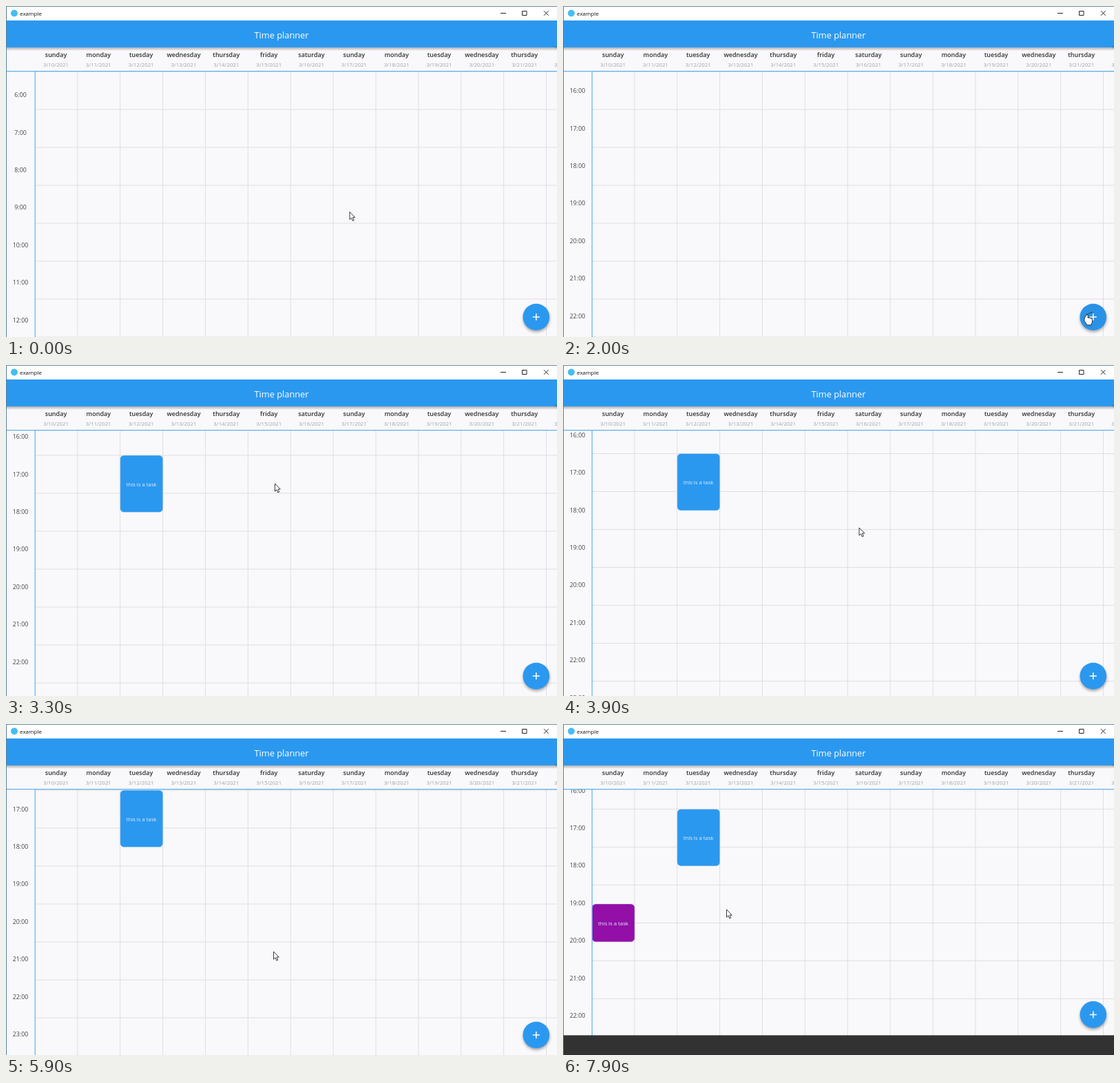
An HTML page that plays this animation: 800 px wide and 480 px high, repeating every 8 s.

```html
<!DOCTYPE html>
<html lang="en">
<head>
<meta charset="utf-8">
<title>Time planner</title>
<style>
html, body { margin: 0; width: 100%; height: 100%; overflow: hidden; background: #f9f8fb; }
svg { display: block; }
text { font-family: "Open Sans", "Noto Sans", sans-serif; text-anchor: middle; }
.day { font-size: 9px; font-weight: 600; fill: #303030; }
.date { font-size: 7.8px; fill: #a0a0a2; }
.hour { font-size: 8.8px; fill: #444; }
.task text { font-size: 7.75px; fill: #e4effa; }
.task rect { stroke: #d9e2ea; stroke-width: .5; }
.grid { stroke: #dfdee1; stroke-width: 1; }
.rule { stroke: #62b1e8; stroke-width: 1.2; }
</style>
</head>
<body>
<svg width="800" height="480" viewBox="0 0 800 480">
  <defs>
    <clipPath id="body"><rect y="95" width="800" height="385"/></clipPath>
    <clipPath id="app"><rect y="21" width="800" height="459"/></clipPath>
    <linearGradient id="shade" x2="0" y2="1">
      <stop offset="0" stop-opacity=".3"/><stop offset="1" stop-opacity="0"/>
    </linearGradient>
    <filter id="soft" x="-30%" y="-30%" width="160%" height="160%"><feGaussianBlur stdDeviation="2"/></filter>
  </defs>
  <rect width="800" height="480" fill="#f9f8fb"/>

  <g clip-path="url(#body)">
    <g id="columns" class="grid"></g>
    <g id="scroller">
      <g id="rows" class="grid"></g>
      <g id="tasks"></g>
    </g>
    <g id="hours"></g>
  </g>
  <path class="rule" d="M0 94.6H800M42.2 95V480"/>
  <g id="days"></g>

  <rect y="60" width="800" height="5" fill="url(#shade)"/>
  <rect y="21" width="800" height="39" fill="#2b98ef"/>
  <text x="400" y="46.6" font-size="12.8" font-weight="500" fill="#fff">Time planner</text>
  <g clip-path="url(#app)" transform="translate(784 37.5)">
    <g transform="rotate(45)">
      <rect x="-40" y="-4.2" width="80" height="8.4" filter="url(#soft)" opacity=".35"/>
      <rect x="-40" y="-4.2" width="80" height="8.4" fill="#7d2343"/>
      <text y="2.6" font-size="7.1" font-weight="800" fill="#fff">DEBUG</text>
    </g>
  </g>

  <rect width="800" height="21" fill="#fff"/>
  <circle cx="12" cy="10.5" r="5" fill="#46bdf0"/>
  <text x="36" y="13.7" font-size="8" fill="#111">example</text>
  <path d="M718 10.5h8M749.5 7.5h6.5v6h-6.5zM781 7.2l6.6 6.6M787.6 7.2l-6.6 6.6" fill="none" stroke="#222"/>

  <g id="fab">
    <circle cx="770" cy="453.5" r="19" filter="url(#soft)" opacity=".38"/>
    <circle id="disc" cx="769.8" cy="451" r="19.3" fill="#2b98ef"/>
    <path d="M764.8 451h10M769.8 446v10" stroke="#fff" stroke-width="1.5"/>
  </g>
  <rect id="snack" y="481" width="800" height="34" fill="#323232"/>
  <path d="M.5 480V.4H800" fill="none" stroke="#587f98"/>

  <g id="cursor" stroke="#222" stroke-width=".9" fill="#fff" stroke-linejoin="round">
    <path id="arrow" d="M0 0V11.2L2.6 8.8L4.3 13L6.2 12.2L4.5 8.1H7.8Z"/>
    <path id="hand" d="M-1.2 1Q0-1 1.2 1V5.2Q2.5 4.4 3.5 5.6Q5 4.9 5.7 6.2Q7.2 5.8 7.4 7.5V11Q7.2 13 6 14.2V15.7H-.8V14.2Q-2.6 11.8-4.3 9Q-4-.2 7.5-3 7.4L-1.2 9.2Z"/>
  </g>
</svg>
<script>
const $ = id => document.getElementById(id);
const DAYS = ["sunday", "monday", "tuesday", "wednesday", "thursday", "friday", "saturday"];
const LOOP = 8000, FRAME = 100;
const TOP = 95, LEFT = 42, CELL_W = 61.875, CELL_H = 55, FIRST_HOUR = 6, LABEL_STEP = 54.4;

function add(parent, tag, attrs, text) {
  const el = document.createElementNS("http://www.w3.org/2000/svg", tag);
  for (const k in attrs) el.setAttribute(k, attrs[k]);
  if (text) el.textContent = text;
  return parent.appendChild(el);
}

for (let i = 0; i < 13; i++) {
  const x = 72.5 + 61.83 * i, line = LEFT + CELL_W * i;
  add($("days"), "text", { x, y: 74.2, class: "day" }, DAYS[i % 7]);
  add($("days"), "text", { x, y: 87.7, class: "date" }, `3/${10 + i}/2021`);
  if (i) add($("columns"), "path", { d: `M${line} ${TOP}V480` });
}
for (let i = 0; i < 19; i++)
  add($("rows"), "path", { d: `M${LEFT} ${TOP + CELL_H * i}H800` });
for (let i = 0; i < 18; i++)
  add($("hours"), "text", { x: 21, y: 132.2 + LABEL_STEP * i, class: "hour" }, `${FIRST_HOUR + i}:00`);

function makeTask(col, hour, hours, fill, since) {
  const x = LEFT + CELL_W * col, y = TOP + CELL_H * (hour - FIRST_HOUR), h = CELL_H * hours;
  const el = add($("tasks"), "g", { class: "task" });
  add(el, "rect", { x, y, width: CELL_W + .2, height: h, rx: 5.5, fill });
  add(el, "text", { x: x + CELL_W / 2, y: y + h / 2 + 3.3 }, "this is a task");
  return { el, x, y, h, since };
}
const tasks = [
  makeTask(2, 17, 1.5, "#2b98ef", 2300),
  makeTask(0, 19.5, 1, "#930fa8", 7000)
];

// Keys are [time, ...values], eased from one to the next.
const scrollKeys = [[800, 550], [2400, 550], [3300, 569], [3700, 569], [4700, 593],
  [5500, 604], [5900, 604], [6200, 576.6]];
const cursorKeys = [[1000, 499, 298.5], [2000, 761, 447], [2400, 761, 447], [2900, 420, 210],
  [3300, 390.5, 172], [3900, 430, 236], [4700, 493.5, 261], [5500, 388.5, 330],
  [5900, 388.5, 330], [6200, 390, 357], [6400, 390, 357], [6800, 762, 446],
  [7000, 762, 446], [7300, 130, 307], [7600, 76, 292], [7700, 76, 292],
  [7800, 85, 290], [7900, 237.5, 269]];
const snackKeys = [[7700, 0], [7800, 15], [7900, 29.6]];

function track(keys, t) {
  const n = keys.findIndex(k => k[0] > t);
  if (n === 0) return keys[0].slice(1);
  if (n < 0) return keys[keys.length - 1].slice(1);
  const a = keys[n - 1], b = keys[n];
  const u = (t - a[0]) / (b[0] - a[0]), e = u * u * (3 - 2 * u);
  return a.slice(1).map((v, i) => v + (b[i + 1] - v) * e);
}

const shift = (id, x, y) => $(id).setAttribute("transform", `translate(${x} ${y})`);
const show = (el, on) => el.setAttribute("visibility", on ? "visible" : "hidden");

function draw(t) {
  const scroll = t < 800 ? 550 * (1 - (1 - t / 800) ** 3) : track(scrollKeys, t)[0];
  const [x, y] = track(cursorKeys, t);
  const [rise] = track(snackKeys, t);
  shift("scroller", 0, -scroll);
  shift("hours", 0, -scroll);
  shift("cursor", x, y);
  shift("snack", 0, -rise);
  shift("fab", 0, -rise);

  const onFab = Math.hypot(x - 769.8, y - 451 + rise) < 19.3;
  let onTask = false;
  for (const k of tasks) {
    const on = t >= k.since, top = k.y - scroll;
    show(k.el, on);
    onTask ||= on && x > k.x && x < k.x + CELL_W && y > top && y < top + k.h;
  }
  $("disc").setAttribute("fill", onFab ? "#2a92e6" : "#2b98ef");
  show($("hand"), onFab || onTask);
  show($("arrow"), !(onFab || onTask));
}

const start = performance.now();
function tick() {
  const t = (performance.now() - start) % LOOP;
  draw(Math.floor(t / FRAME) * FRAME);
  requestAnimationFrame(tick);
}
tick();
</script>
</body>
</html>
```
